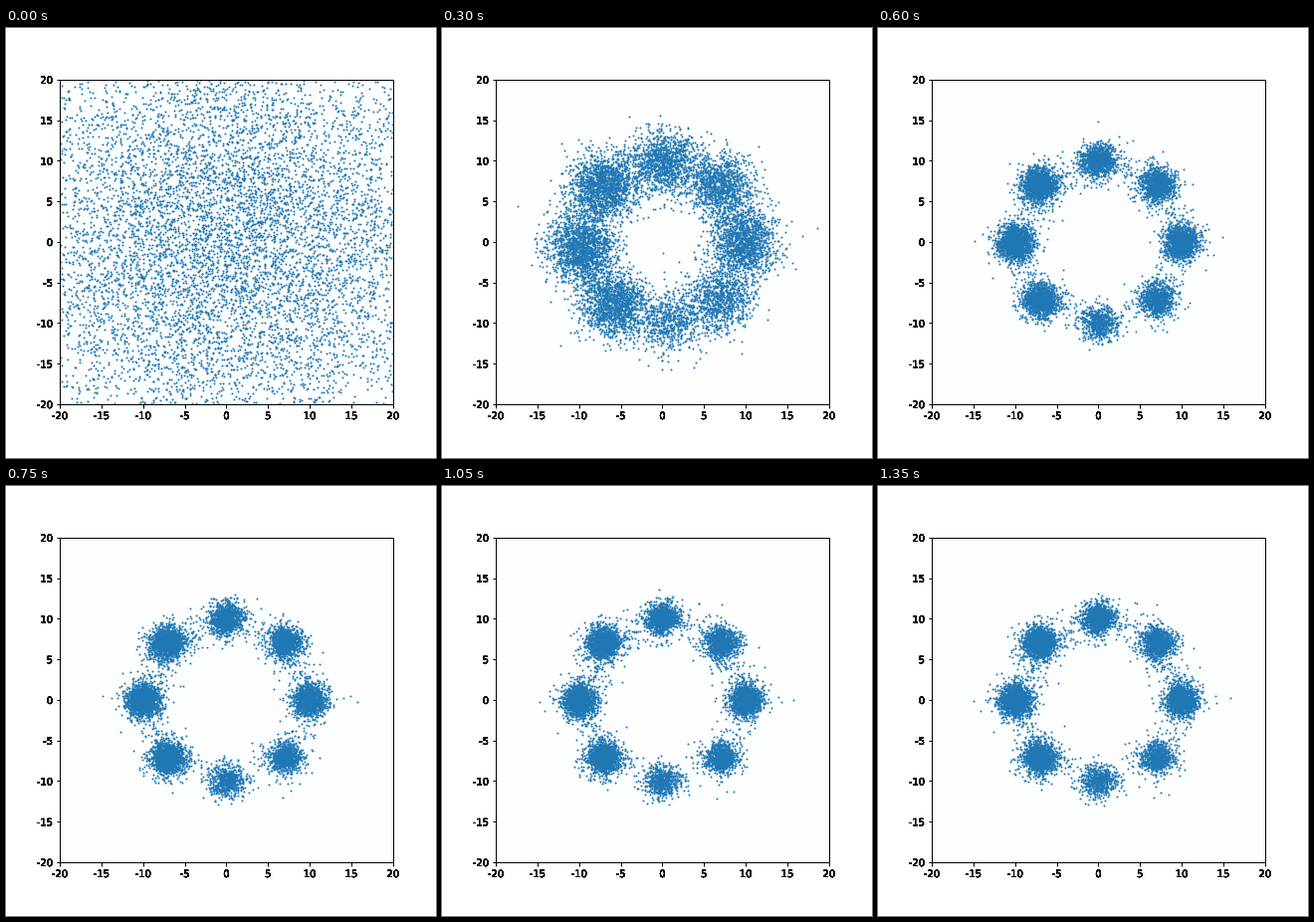
These frames come from a looping animation (432x432 px, 1500 ms). A matplotlib script:

```python
import numpy as np
import matplotlib.pyplot as plt
from matplotlib.animation import FuncAnimation
from matplotlib.patheffects import Normal

plt.rcParams.update({"font.family": "DejaVu Sans", "font.size": 10,
                     "axes.unicode_minus": False})

N = 10000
STEPS = 10
DECAY = 0.27
SHARES = (14, 11.5, 11.5, 16.5, 16.5, 14.5, 6.5, 9)  # cluster sizes in percent

rng = np.random.default_rng(8)


def ring(turn):
    a = 2 * np.pi * turn
    return np.column_stack([np.cos(a), np.sin(a)])


# Points are ordered around the circle, first spread evenly, then by cluster
u = (np.arange(N) + 0.5) / N
label = np.searchsorted(np.cumsum(SHARES) / 100, u)
even = ring(u - SHARES[0] / 200)
home = ring(label / 8)

# A few points sit on the chord towards a neighbouring cluster
neighbour = ring((label + rng.choice([-1, 1], N)) / 8)
slide = (rng.random(N) < 0.06) * rng.uniform(0, 0.5, N)
home += slide[:, None] * (neighbour - home)

settled = 0.9 * rng.standard_t(10, size=(N, 2))


def cloud(i):
    noise = np.random.default_rng(100 + i).normal(size=(N, 2))
    keep = 1 - (1 - i / (STEPS - 1)) ** 3
    offset = keep * settled + np.sqrt(1 - keep ** 2) * noise
    center = home + DECAY ** (i - 1) * (even - home)
    radius = 10 * (1 - 0.1 ** i)
    spread = 1 + 13.4 * DECAY ** i
    return radius * center + spread * offset


fig = plt.figure(figsize=(6, 6), dpi=72, facecolor="white")
ax = fig.add_axes([0.125, 0.125, 0.775, 0.755], facecolor="#fcfdfd")
ticks = range(-20, 21, 5)
ax.set(xlim=(-20, 20), ylim=(-20, 20), xticks=ticks, yticks=ticks)
ax.tick_params(width=1)
for spine in ax.spines.values():
    spine.set_linewidth(1)
# Overdrawing turns the soft label edges solid
for text in ax.get_xticklabels() + ax.get_yticklabels():
    text.set_path_effects([Normal()] * 16)

dots, = ax.plot([], [], ".", ms=2, color="#1f77b4")


def draw(i):
    dots.set_data(*cloud(i).T)
    return dots,


anim = FuncAnimation(fig, draw, frames=STEPS, interval=150,
                     init_func=lambda: draw(0), repeat=True, repeat_delay=0)
plt.show()
```
